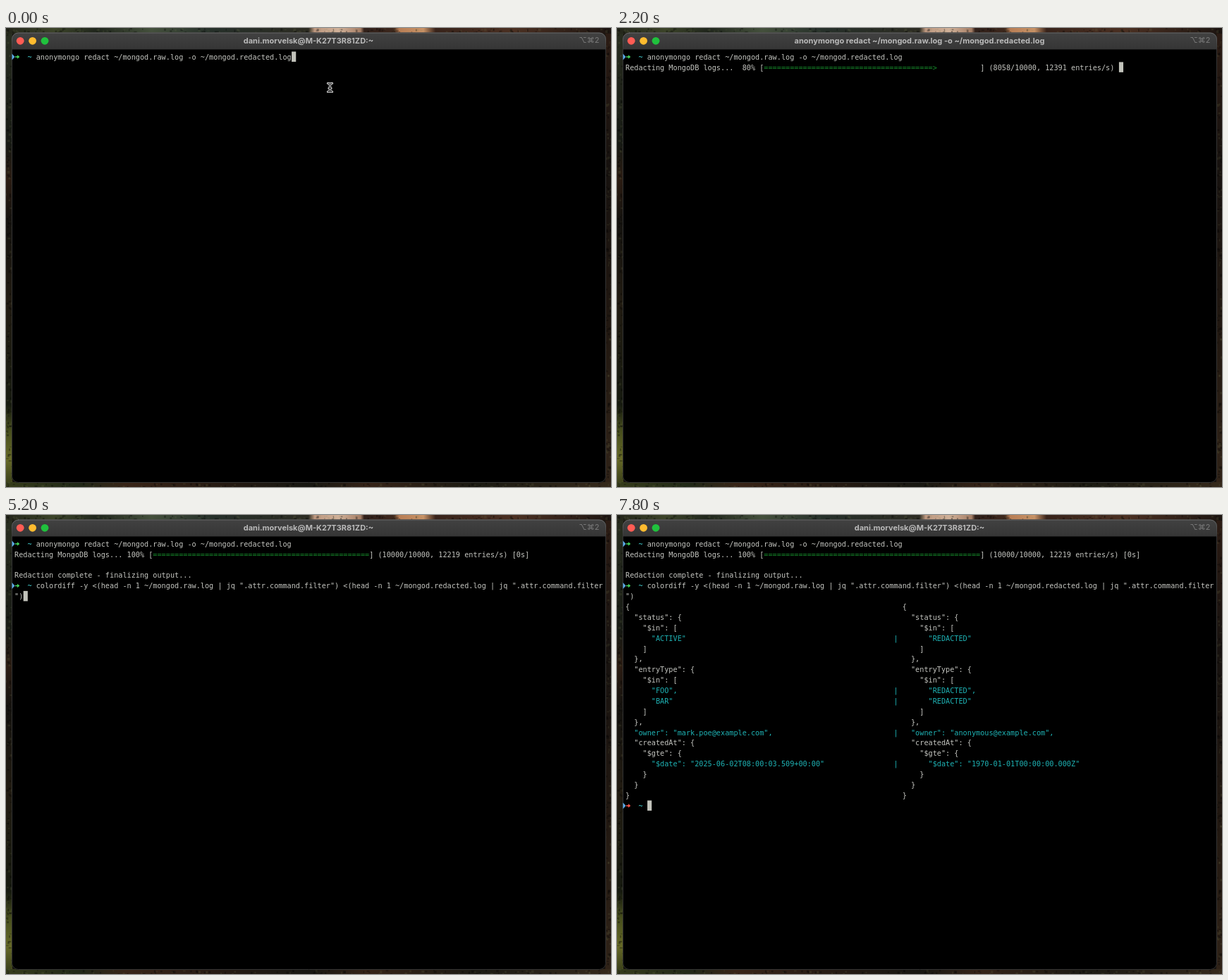
Write an HTML page with a canvas that moves like this. It is 858 by 652 pixels and loops after 8 s.

```html
<!DOCTYPE html>
<html lang="en">
<head>
<meta charset="utf-8">
<title>Terminal session</title>
<style>
  html, body { margin: 0; width: 100%; height: 100%; overflow: hidden; background: #000; }
  canvas { display: block; }
</style>
</head>
<body>
<canvas id="stage" width="858" height="652"></canvas>
<script>
const ctx = document.getElementById("stage").getContext("2d");
const W = 858, H = 652, LOOP = 8000, STEP = 200;
const CELL = 6.136, LINE = 14.88, LEFT = 12, BASE = 44.7, COLUMNS = 136;
const TEXT = "#c5c6c1", CYAN = "#1eb3b5", GREEN = "#168a2b", CURSOR = "#c2c3bb";

const HOME = "dani.morvelsk@M-K27T3R81ZD:~";
const REDACT = "anonymongo redact ~/mongod.raw.log -o ~/mongod.redacted.log";
const filterOf = file => `<(head -n 1 ~/mongod.${file}.log | jq ".attr.command.filter")`;
const DIFF_START = "colordiff -y " + filterOf("raw");
const DIFF = DIFF_START + " " + filterOf("redacted");

// Moments of the session, in ms
const RUN = 1549.67, DONE = 2400, RECALL = 4000, CLEAR = 4200, RECALL_DIFF = 4800,
      DIFF_RUN = 6000, DIFF_DONE = 6200;

// A second entry marks a line that differs
const DIFF_LINES = [
  ['{'],
  ['  "status": {'],
  ['    "$in": ['],
  ['      "ACTIVE"', '      "REDACTED"'],
  ['    ]'],
  ['  },'],
  ['  "entryType": {'],
  ['    "$in": ['],
  ['      "FOO",', '      "REDACTED",'],
  ['      "BAR"', '      "REDACTED"'],
  ['    ]'],
  ['  },'],
  ['  "owner": "mark.poe@example.com",', '  "owner": "anonymous@example.com",'],
  ['  "createdAt": {'],
  ['    "$gte": {'],
  ['      "$date": "2025-06-02T08:00:03.509+00:00"', '      "$date": "1970-01-01T00:00:00.000Z"'],
  ['    }'],
  ['  }'],
  ['}']
];

function seeded(seed) {
  return () => (seed = (seed * 16807) % 2147483647) / 2147483647;
}

function gradient(x0, y0, x1, y1, stops) {
  const g = ctx.createLinearGradient(x0, y0, x1, y1);
  stops.forEach(([at, color]) => g.addColorStop(at, color));
  return g;
}

function box(x, y, w, h, fill) {
  ctx.fillStyle = fill;
  ctx.fillRect(x, y, w, h);
}

function drawBackdrop() {
  box(0, 0, W, H, "#17130f");
  box(0, 0, W, 8, gradient(0, 0, W, 0, [
    [0, "#23251a"], [.08, "#3c4429"], [.15, "#20261c"], [.24, "#44503c"], [.34, "#26302a"],
    [.5, "#2c2b22"], [.51, "#bd9880"], [.55, "#d0b199"], [.586, "#a77f67"], [.592, "#30201a"],
    [.64, "#3d271c"], [.65, "#b87e55"], [.69, "#c89266"], [.71, "#38231a"], [.84, "#4b3022"], [1, "#1d1511"]
  ]));
  box(0, 8, 9, H, gradient(0, 0, 0, H, [
    [0, "#292e20"], [.25, "#171a14"], [.33, "#2c1d13"], [.42, "#15130f"], [.6, "#221c12"],
    [.82, "#171b10"], [.88, "#49501e"], [.94, "#666927"], [1, "#353a19"]
  ]));
  box(850, 8, 8, H, gradient(0, 0, 0, H, [
    [0, "#2c1c14"], [.3, "#17120f"], [.65, "#211811"], [1, "#302318"]
  ]));
  box(0, 645, W, 7, gradient(0, 0, W, 0, [
    [0, "#363c1b"], [.12, "#202817"], [.2, "#382417"], [.36, "#251a12"], [.5, "#171711"],
    [.6, "#352317"], [.78, "#1b1a12"], [1, "#35291b"]
  ]));
  const random = seeded(73);
  for (let i = 0; i < 600; i++) {
    const alongTop = i % 2, bright = random() > .6;
    const x = alongTop ? random() * W : (random() > .5 ? 850 : 0) + random() * 8;
    const y = alongTop ? (random() > .5 ? 646 : 0) + random() * 6 : random() * H;
    box(x, y, 1 + random() * 3, 1 + random() * 3, bright ? "#7c805526" : "#00000055");
  }
}

function drawWindow(title) {
  ctx.save();
  ctx.beginPath();
  ctx.roundRect(8, 6.5, 843, 639.5, 9);
  ctx.clip();
  box(8, 6, 844, 641, "#000");
  box(8, 6, 844, 24.5, gradient(0, 6, 0, 30, [[0, "#424242"], [1, "#363636"]]));
  box(8, 30, 844, 1, "#191919");
  ctx.restore();

  ctx.beginPath();
  ctx.roundRect(8.5, 7, 842, 638.5, 9);
  ctx.lineWidth = 1;
  ctx.strokeStyle = gradient(0, 7, 0, 32, [[0, "#686868"], [1, "#343434"]]);
  ctx.stroke();

  ["#ff5c54", "#febb2f", "#20c13d"].forEach((color, i) => {
    ctx.beginPath();
    ctx.arc(20.2 + i * 17.4, 18.3, 5.4, 0, 7);
    ctx.fillStyle = color;
    ctx.fill();
  });
  ctx.fillStyle = "#b9b9b9";
  ctx.font = "bold 11px Inter, sans-serif";
  ctx.textAlign = "center";
  ctx.fillText(title, 429, 21.8);
  ctx.fillStyle = "#7c7c7c";
  ctx.font = "11px Inter, 'DejaVu Sans', sans-serif";
  ctx.textAlign = "right";
  ctx.fillText("⌥⌘2", 841.5, 21);
}

function write(row, col, text, color = TEXT) {
  ctx.font = "10.19px 'DejaVu Sans Mono', monospace";
  ctx.textAlign = "left";
  ctx.fillStyle = color;
  [...text].forEach((char, i) => {
    const cell = col + i;
    const line = row + Math.floor(cell / COLUMNS);
    ctx.fillText(char, LEFT + (cell % COLUMNS) * CELL, BASE + line * LINE);
  });
}

function cursor(row, col) {
  box(LEFT + col * CELL + .4, 33.5 + row * LINE, CELL, LINE - .4, CURSOR);
}

function prompt(row, command = "", arrowColor = "#43d65b") {
  const y = 41 + row * LINE;
  ctx.fillStyle = "#5ca9e6";
  ctx.fill(new Path2D(`M8.5 ${y - 4.5} l4 4.5 l-4 4.5z`));
  ctx.fillStyle = arrowColor;
  ctx.fill(new Path2D(`M13 ${y - .8} h3 v-2 l3.3 2.8 l-3.3 2.8 v-2 h-3z`));
  write(row, 3, "~", "#45d7d9");
  write(row, 5, command);
}

function drawProgress(elapsed) {
  const rate = 13054.3 - 1.02 * elapsed;
  const count = Math.round(rate * elapsed / 1000);
  const percent = Math.floor(count / 100);
  const bar = "=".repeat(Math.max(0, Math.floor(percent / 2) - 1)) + ">";
  const tail = `] (${count}/10000, ${Math.round(rate)} entries/s) `;
  write(1, 0, `Redacting MongoDB logs... ${String(percent).padStart(3)}% [`);
  write(1, 32, bar, GREEN);
  write(1, 82, tail);
  cursor(1, 82 + tail.length);
}

function drawFinished() {
  write(1, 0, "Redacting MongoDB logs... 100% [");
  write(1, 32, "=".repeat(50), GREEN);
  write(1, 82, "] (10000/10000, 12219 entries/s) [0s]");
  write(3, 0, "Redaction complete - finalizing output...");
}

function drawDiff() {
  DIFF_LINES.forEach(([before, after], i) => {
    const color = after ? CYAN : TEXT;
    write(6 + i, 0, before, color);
    write(6 + i, 64, after || before, color);
    if (after) write(6 + i, 62, "|", color);
  });
  prompt(25, "", "#ff5548");
  cursor(25, 5);
}

function drawPointer(x, y) {
  const beam = new Path2D(
    `M${x - 3} ${y - 6} q3 0 3 2 q0 -2 3 -2 M${x} ${y - 4} v8 M${x - 3} ${y + 6} q3 0 3 -2 q0 2 3 2 M${x - 1.5} ${y + 1} h3`);
  ctx.lineCap = "round";
  [[3.2, "#e6e6e6"], [1.2, "#111"]].forEach(([width, color]) => {
    ctx.lineWidth = width;
    ctx.strokeStyle = color;
    ctx.stroke(beam);
  });
}

function recalledCommand(t) {
  if (t < RECALL) return "";
  if (t < CLEAR) return REDACT;
  return t < RECALL_DIFF ? "clear" : DIFF;
}

function draw(t) {
  const redacting = t >= RUN && t < DONE;
  const diffing = t >= DIFF_RUN && t < DIFF_DONE;
  drawBackdrop();
  drawWindow(redacting ? REDACT : diffing ? DIFF_START : HOME);
  prompt(0, REDACT);
  if (t < RUN) {
    cursor(0, 5 + REDACT.length);
    drawPointer(459.5, 84.5);
    return;
  }
  if (redacting) return drawProgress(t - RUN);

  drawFinished();
  const command = recalledCommand(t);
  prompt(4, command);
  if (t >= DIFF_DONE) drawDiff();
  else if (diffing) cursor(6, 0);
  else {
    const end = 5 + command.length;
    cursor(4 + Math.floor(end / COLUMNS), end % COLUMNS);
  }
}

let shown = -1;
const start = performance.now();
function tick() {
  const t = Math.floor(((performance.now() - start) % LOOP) / STEP) * STEP;
  if (t !== shown) draw(shown = t);
  requestAnimationFrame(tick);
}
tick();
</script>
</body>
</html>
```
